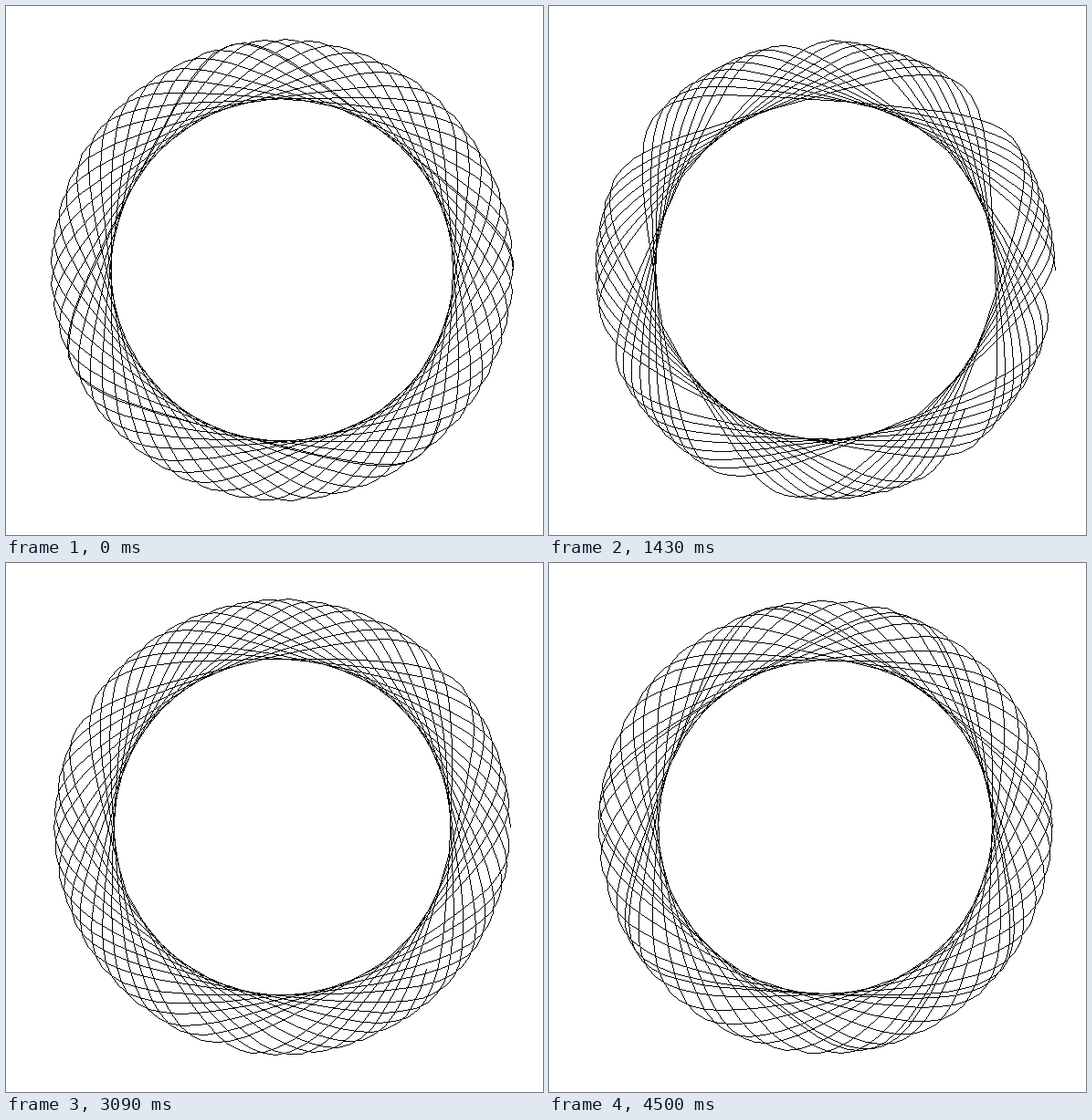
These frames come from a looping animation (588 px wide and 580 px high, 4.55 s). An HTML page with a canvas:

```html
<!DOCTYPE html>
<html lang="en">
<head>
<meta charset="utf-8">
<title>Spirograph</title>
<style>
  html, body { margin: 0; width: 100%; height: 100%; overflow: hidden; background: #fff; }
  canvas { display: block; }
</style>
</head>
<body>
<canvas id="stage" width="588" height="580"></canvas>
<script>
const W = 588, H = 580, LOOP = 4550;
const CX = 302, CY = 289;
const RING = 307, PEN = 33;          // fixed ring radius and pen offset
const WHEEL = 86.9, GROWTH = 0.05;   // rolling wheel radius, growth per step
const POINTS = 1000, DT = 0.1;

// Key points of the slightly uneven pace: [ms, step]
const PACE = [
  [0, 0], [540, 11], [1110, 23], [1430, 28], [2430, 49],
  [3090, 62], [3820, 77], [3880, 79], [4030, 80], [4500, 90]
];

const ctx = document.getElementById('stage').getContext('2d');
const image = ctx.createImageData(W, H);
const pixels = new Uint32Array(image.data.buffer);
const WHITE = 0xffffffff, BLACK = 0xff000000;

function stepAt(ms) {
  const k = PACE.findIndex(([t]) => t > ms);
  if (k < 0) return PACE[PACE.length - 1][1];
  const [t0, s0] = PACE[k - 1], [t1, s1] = PACE[k];
  return Math.floor(s0 + (s1 - s0) * (ms - t0) / (t1 - t0));
}

// Hard-edged one pixel line
function line(x, y, x1, y1) {
  const dx = Math.abs(x1 - x), dy = -Math.abs(y1 - y);
  const sx = x < x1 ? 1 : -1, sy = y < y1 ? 1 : -1;
  let err = dx + dy;
  for (;;) {
    pixels[y * W + x] = BLACK;
    if (x === x1 && y === y1) return;
    const e2 = 2 * err;
    if (e2 >= dy) { err += dy; x += sx; }
    if (e2 <= dx) { err += dx; y += sy; }
  }
}

function draw(step) {
  const wheel = WHEEL + GROWTH * step;
  const arm = RING - wheel, ratio = arm / wheel;
  const point = t => [
    Math.round(CX + arm * Math.cos(t) + PEN * Math.cos(ratio * t)),
    Math.round(CY - arm * Math.sin(t) + PEN * Math.sin(ratio * t))
  ];
  pixels.fill(WHITE);
  let prev = point(0);
  for (let i = 1; i < POINTS; i++) {
    const next = point(i * DT);
    line(...prev, ...next);
    prev = next;
  }
  ctx.putImageData(image, 0, 0);
}

const start = performance.now();
let shown = -1;

function tick() {
  const step = stepAt((performance.now() - start) % LOOP);
  if (step !== shown) draw(shown = step);
  requestAnimationFrame(tick);
}
tick();
</script>
</body>
</html>
```
